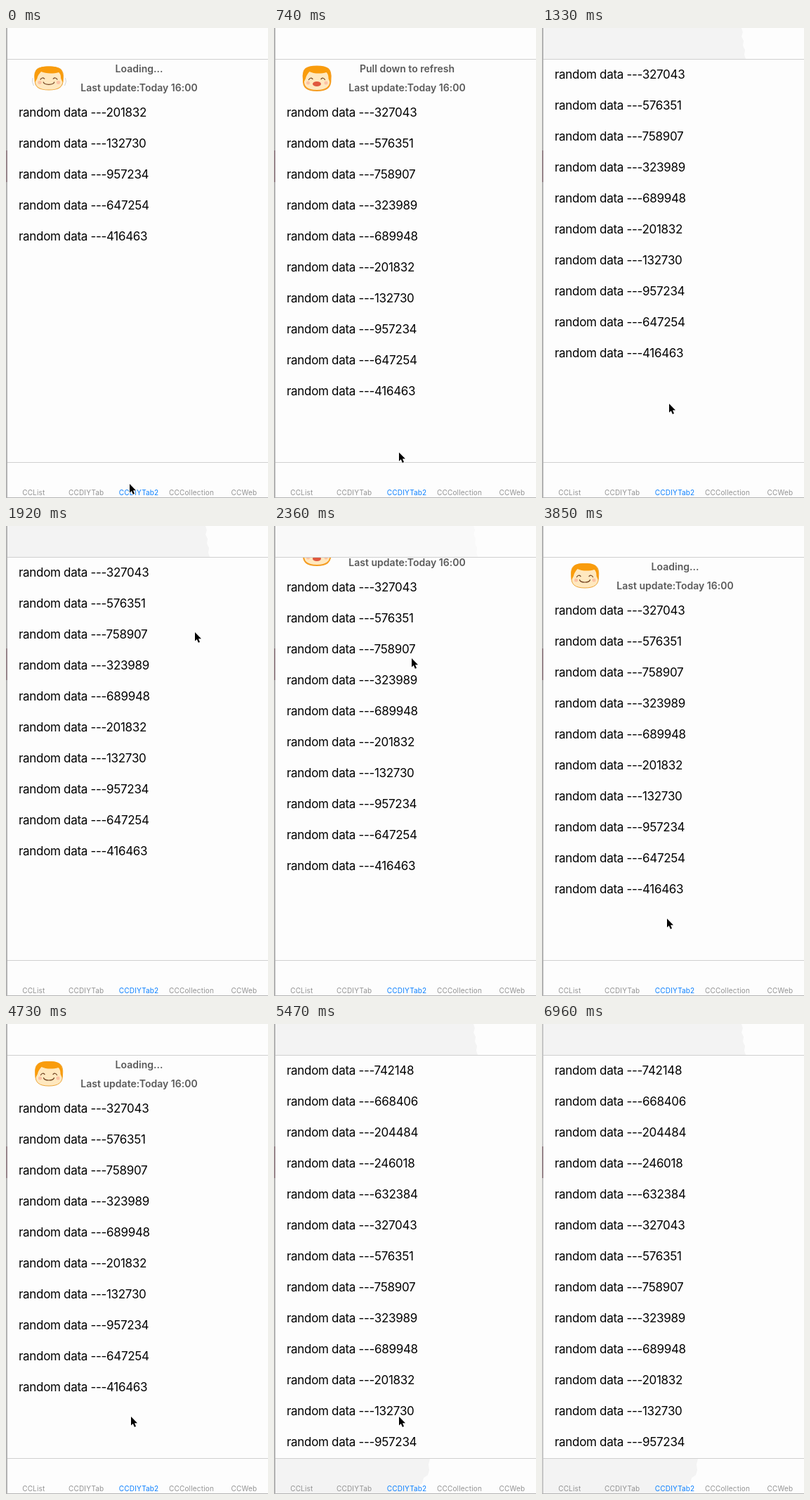
An HTML page that plays this animation: 373 px wide and 668 px high, repeating every 7060 ms.

```html
<!DOCTYPE html>
<html lang="en">
<head>
<meta charset="utf-8">
<title>Pull to refresh</title>
<style>
  html, body { margin: 0; width: 100%; height: 100%; overflow: hidden; background: #fdfdfd; }
  svg { display: block; width: 100vw; height: 100vh; font-family: Inter, Roboto, sans-serif; }
  .row { font-size: 17px; letter-spacing: -.31px; white-space: pre; }
  .label { font-size: 14px; font-weight: 600; letter-spacing: .01px; fill: #5a5a5a; text-anchor: middle; }
  .tab { font-size: 10px; letter-spacing: .17px; fill: #929292; text-anchor: middle; }
  .tab.on { fill: #0a7fff; }
</style>
</head>
<body>
<svg viewBox="0 0 373 668" xmlns="http://www.w3.org/2000/svg">
  <defs>
    <clipPath id="page"><rect x="2" y="45" width="371" height="572"/></clipPath>
    <radialGradient id="glow" gradientUnits="userSpaceOnUse" r="1" gradientTransform="translate(63 6) scale(43 62)">
      <stop offset="0" stop-color="#fcefd9"/>
      <stop offset=".4" stop-color="#faf0e0"/>
      <stop offset="1" stop-color="#f3f3f3"/>
    </radialGradient>
  </defs>
  <rect width="373" height="668" fill="#fdfdfd"/>

  <g clip-path="url(#page)">
    <g id="header">
      <g id="face" stroke-linecap="round" stroke-linejoin="round">
        <path id="head" fill="#ffe8bf" stroke="#eda63a" d="M42 72C40 57 46 53.500 61 53.500C76 53.500 82 57 80.500 72C81 83 75 88 61 88C47 88 41 83 42 72Z"/>
        <path fill="#f99c0c" d="M42 77C39.500 58 45 53 61 53C77 53 82.500 58 80 77L77.500 71C77.500 66 76.500 64 74.500 62C67 64.500 56 64 50.500 61C48 64 45.500 67 45 71Z"/>
        <circle cx="48.500" cy="77" r="2.500" fill="#fcc2a4"/>
        <circle cx="74" cy="77" r="2.500" fill="#fcc2a4"/>
        <path fill="none" stroke="#70401f" stroke-width="1.200" d="M49.500 72.500Q52 68.500 55 71.500M67 71.500Q70 68.500 72.500 72.500"/>
        <path id="smile" fill="none" stroke="#70401f" stroke-width="1.200" d="M53.500 76.500Q54.500 80 61 80Q67.500 80 68.500 76.500"/>
        <ellipse id="mouth" cx="61" cy="78.500" rx="6" ry="3.500" fill="#e0583f"/>
      </g>
      <path id="shake" fill="none" stroke="#c9c9c9" stroke-width=".8" d="M38 71Q36 76 39.500 82M84.500 71Q87 76 83.500 82"/>
      <text id="status" class="label" x="189.500" y="63"></text>
      <text class="label" x="189.500" y="90">Last update:Today 16:00</text>
    </g>
    <g id="list"></g>
  </g>

  <g id="navBlur">
    <path fill="#f3f3f3" d="M2 0H284L286 6L284 12L287 18L286 25L289 31L288 38L290 44H2Z"/>
    <rect x="2" width="110" height="44" fill="url(#glow)"/>
  </g>
  <path id="tabBlur" fill="#f3f3f3" d="M2 618H222L220 626L221 634L219 641L213 645L211 653L205 656L201 667H2Z"/>
  <path d="M2 44.500H373M2 617.500H373" stroke="#cfcfcf"/>
  <g id="tabs"></g>

  <rect id="edge" width="2" height="668"/>
  <rect y="174" width="2" height="45" fill="#98868c"/>
  <rect y="667" width="373" height="1" fill="#b4b4b4"/>
  <path id="cursor" stroke="#fff" stroke-width="1.200" paint-order="stroke" d="M0 0V12.500L2.800 9.900L4.800 14.800L7 13.900L5 9.200H9Z"/>
</svg>
<script>
const LOOP = 7060, STEP = 147.4;
const ROW = 44, HEADER = 54, BATCH = 5;
const numbers = [
  742148, 668406, 204484, 246018, 632384,
  327043, 576351, 758907, 323989, 689948,
  201832, 132730, 957234, 647254, 416463
];

// Keys are [step, value, ...].
const pullKeys = [[0, 54], [5, 54], [8, 0], [14, 0], [15, 5], [16, 21],
  [17, 88], [18, 150], [19, 110], [20, 54], [33, 54], [36, 0]];
const cursorKeys = [[0, 175, 647], [2, 175, 647], [9, 180, 533], [10, 190, 480],
  [13, 268, 150], [14, 255, 135], [15, 212, 148], [16, 195, 187],
  [17, 192, 330], [18, 186, 480], [19, 177, 557]];

const $ = id => document.getElementById(id);
const show = (id, on) => $(id).setAttribute('visibility', on ? 'visible' : 'hidden');
const move = (id, x, y) => $(id).setAttribute('transform', `translate(${x} ${y})`);

function addText(parent, cls, x, y, text) {
  const el = document.createElementNS('http://www.w3.org/2000/svg', 'text');
  el.setAttribute('class', cls);
  el.setAttribute('x', x);
  el.setAttribute('y', y);
  el.textContent = text;
  parent.append(el);
}

function sample(keys, k) {
  const i = keys.findIndex(key => key[0] > k);
  if (i < 0) return keys[keys.length - 1].slice(1);
  const a = keys[i - 1], b = keys[i];
  const u = (k - a[0]) / (b[0] - a[0]);
  const e = u * u * (3 - 2 * u);
  return a.slice(1).map((v, j) => v + (b[j + 1] - v) * e);
}

numbers.forEach((n, i) => addText($('list'), 'row', 18, 72 + i * ROW, `random data ---${n}`));
['CCList', 'CCDIYTab', 'CCDIYTab2', 'CCCollection', 'CCWeb'].forEach((name, i) =>
  addText($('tabs'), i === 2 ? 'tab on' : 'tab', 39.3 + i * 74.9, 663.7, name));

function draw(ms) {
  const k = Math.floor(ms / STEP);
  const [pull] = sample(pullKeys, k);
  const [cx, cy] = sample(cursorKeys, k);
  const loading = k < 5 || (k >= 19 && k < 33);
  const hiddenBatches = k < 5 ? 2 : k < 33 ? 1 : 0;
  const pose = loading ? k % 3 : 2;

  move('list', 0, pull - hiddenBatches * BATCH * ROW);
  // Newer rows stay out of the header until they are loaded.
  [...$('list').children].forEach((row, i) =>
    row.setAttribute('visibility', i < hiddenBatches * BATCH ? 'hidden' : 'visible'));

  move('header', 0, pull - HEADER);
  $('status').textContent = loading ? 'Loading...'
    : pull > HEADER ? 'Release to refresh' : 'Pull down to refresh';

  const [sx, sy] = [[1.04, .96], [1.02, .98], [1, 1]][pose];
  $('face').setAttribute('transform',
    `translate(61.3 88) scale(${sx} ${sy}) translate(-61.3 ${loading ? -88 : -87})`);
  $('head').setAttribute('stroke', loading ? '#eda63a' : '#f59d22');
  $('head').setAttribute('stroke-width', loading ? 1 : 2);
  show('shake', pose === 0);
  show('smile', loading);
  show('mouth', !loading);

  $('navBlur').setAttribute('opacity', Math.max(0, 1 - pull / 34));
  $('tabBlur').setAttribute('opacity', k < 33 ? 0 : 1 - pull / HEADER);
  $('edge').setAttribute('fill', k >= 47 ? '#c6c6c6' : '#b2b2b2');

  move('cursor', cx + 1, cy + 1);
  $('cursor').setAttribute('opacity', k < 40 ? 1 : k < 41 ? .45 : 0);
}

const start = performance.now();
function tick() {
  draw((performance.now() - start) % LOOP);
  requestAnimationFrame(tick);
}
tick();
</script>
</body>
</html>
```
